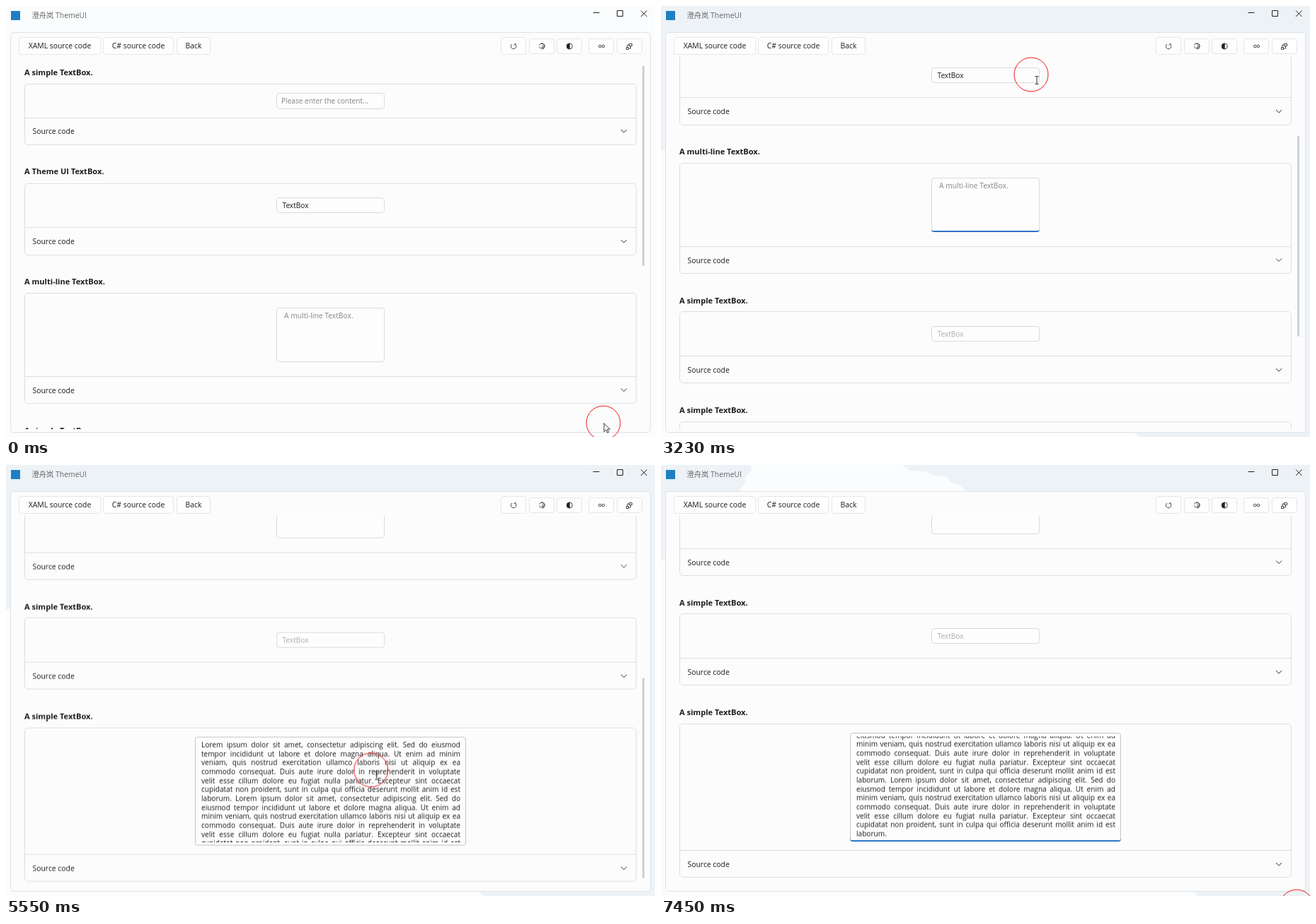
Recreate the animation shown at these times as an HTML page. Size 917x610 px, loop 7.5 s.

```html
<!DOCTYPE html>
<html lang="en">
<head>
<meta charset="utf-8">
<title>TextBox gallery</title>
<style>
  html, body { margin: 0; width: 917px; height: 610px; overflow: hidden; }
  body { position: relative; background: #fafcfd; color: #1c1c1c; font: 10.4px/16px "Open Sans", "Noto Sans", sans-serif; }
  div, svg, span { position: absolute; box-sizing: border-box; }
  span { white-space: nowrap; }
  svg { left: 0; top: 0; overflow: visible; fill: none; stroke: #333; }

  .panel { left: 6px; top: 37px; width: 905px; height: 567px; background: #fcfcfc; border: 1px solid #dfe2e4; border-radius: 5px; }
  .btn { top: 44px; height: 25px; line-height: 23px; text-align: center; background: #fefefe; border: 1px solid #e6e6e6; border-radius: 4px; }
  .icon { top: 46px; width: 36px; height: 22px; }
  .view { left: 0; top: 72px; width: 917px; height: 527px; overflow: hidden; }
  .page { left: 0; top: -72px; width: 917px; height: 1000px; }
  .head { left: 26px; font-weight: 700; font-size: 11.05px; }
  .card { left: 26px; width: 865px; border: 1px solid #dedede; border-radius: 5px; }
  .rule { left: 0; right: 0; height: 1px; background: #dedede; }
  .box { left: 382px; width: 153px; background: #fdfdfd; border: 1px solid #dadada; border-radius: 4px; font-size: 10.1px; }
  .box > span { left: 7.5px; top: 2px; }
  .hint { color: #868686; }
  .off { color: #adadad; }
  .focus { inset: -1px; border-bottom: 2px solid #2b74c9; border-radius: 4px; }
  .caret { left: 46px; top: 5px; width: 1px; height: 12px; background: #111; }
  .clip { left: 8px; right: 7px; top: 4px; bottom: 4px; overflow: hidden; }
  .lorem { left: 0; right: 0; top: 0; }
  .lorem p { margin: 0; height: 12.67px; line-height: 12.67px; white-space: nowrap; text-align: justify; text-align-last: justify; }
  .lorem p:last-child { text-align-last: left; }
  .thumb { left: 899px; top: 84px; width: 3px; height: 283.5px; border-radius: 2px; background: #d0d1d1; }

  .page, .thumb, .lorem, .pointer, .step { animation: 7.5s linear infinite; }
  .step { animation-timing-function: step-end; }
  .page { animation-name: scroll; }
  .thumb { animation-name: slide, fade; }
  .lorem { animation-name: inner; }
  .pointer { animation-name: move; animation-timing-function: ease-in-out; }
  .tint { animation-name: tint; }
  .blob { animation-name: blob; }
  .f1 { animation-name: f1; }
  .f2 { animation-name: f2; }
  .f3 { animation-name: f3; }
  .f5 { animation-name: f5; }
  .beam { animation-name: beam; }
  .arrow { animation-name: arrow; }

  @keyframes scroll {
    0%, 24% { transform: translateY(0); }
    33.3%, 58.5% { transform: translateY(-184px); }
    66.4%, 69.2% { transform: translateY(-368px); }
    74.7%, 82% { transform: translateY(-405px); }
    86%, 100% { transform: translateY(-406px); }
  }
  @keyframes slide {
    0%, 24% { transform: translateY(0); }
    33.3%, 58.5% { transform: translateY(99.8px); }
    66.4%, 69.2% { transform: translateY(199.2px); }
    74.7%, 82% { transform: translateY(219.5px); }
    86%, 100% { transform: translateY(220px); }
  }
  @keyframes fade {
    0%, .7% { opacity: 1; }
    5.3%, 24% { opacity: 0; }
    25%, 55.8% { opacity: 1; }
    55.86%, 58.5% { opacity: .6; }
    59.5%, 98% { opacity: 1; }
    99.3%, 100% { opacity: 0; }
  }
  @keyframes inner {
    0%, 77.87% { transform: translateY(0); }
    79.87% { transform: translateY(-66.5px); }
    85.3%, 100% { transform: translateY(-96.5px); }
  }
  @keyframes move {
    0%, .67% { transform: translate(844px, 590px); }
    10.4%, 14.4% { transform: translate(470px, 128px); }
    21.8%, 24% { transform: translate(467px, 280.5px); }
    33.47%, 35.6% { transform: translate(467px, 300px); }
    37.33% { transform: translate(470px, 349px); }
    43.05% { transform: translate(523px, 97px); }
    44.4%, 46.53% { transform: translate(531px, 88px); }
    51%, 58.53% { transform: translate(524px, 96.5px); }
    66.5%, 69.2% { transform: translate(472px, 432px); }
    75.6%, 81.3% { transform: translate(522px, 431.5px); }
    86.53%, 88% { transform: translate(480px, 462px); }
    90.67% { transform: translate(301px, 490px); }
    96.67%, 100% { transform: translate(898px, 625px); }
  }
  @keyframes tint { 0% { opacity: 0; } 10.4%, 100% { opacity: 1; } }
  @keyframes blob { 0% { opacity: 0; } 88%, 100% { opacity: 1; } }
  @keyframes f1 { 0% { opacity: 0; } 9.9% { opacity: 1; } 20%, 100% { opacity: 0; } }
  @keyframes f2 { 0% { opacity: 0; } 20% { opacity: 1; } 32% { opacity: 0; } 49.3% { opacity: 1; } 74.7%, 100% { opacity: 0; } }
  @keyframes f3 { 0% { opacity: 0; } 32% { opacity: 1; } 49.3%, 100% { opacity: 0; } }
  @keyframes f5 { 0% { opacity: 0; } 74.7%, 100% { opacity: 1; } }
  @keyframes beam {
    0%, 15%, 24.7%, 36%, 39.9%, 49.3%, 92%, 100% { opacity: 0; }
    9.6%, 21%, 30%, 38.1%, 42.8%, 65.3% { opacity: 1; }
  }
  @keyframes arrow {
    0%, 15%, 24.7%, 36%, 39.9%, 49.3%, 92%, 100% { opacity: 1; }
    9.6%, 21%, 30%, 38.1%, 42.8%, 65.3% { opacity: 0; }
  }
</style>
</head>
<body>
<svg width="917" height="610" style="stroke:none">
  <path class="step tint" fill="#edf2f7" d="M0 0H917V610H676L668 603 7 203 0 205Z"/>
  <path class="step blob" fill="#fafcfd" d="M126 0 128 8 118 18 120 24 109 38H433L420 27 408 24 405 17 385 14 372 9 352 8 340 0ZM0 135 7 133V206H0ZM660 603H754L757 610H660Z"/>
</svg>

<svg width="917" height="36">
  <rect x="7" y="7" width="13" height="13" fill="#1f7fc4" stroke="none"/>
  <path d="M829.5 9.5H838.5M863.5 6.5H871.5V14.5H863.5ZM897 6.5 905.5 15M905.5 6.5 897 15" stroke="#222"/>
</svg>
<span style="left:36.5px;top:5px;color:#666"><span style="position:static;font:10.3px 'Noto Sans CJK SC','Noto Sans CJK',sans-serif">澄舟岚</span> ThemeUI</span>

<div class="panel"></div>
<div class="btn" style="left:18px;width:116px">XAML source code</div>
<div class="btn" style="left:137px;width:100px">C# source code</div>
<div class="btn" style="left:241px;width:48px">Back</div>
<div class="btn icon" style="left:699px;top:44px;height:25px"></div>
<div class="btn icon" style="left:739px"></div>
<div class="btn icon" style="left:778px"></div>
<div class="btn icon" style="left:823px"></div>
<div class="btn icon" style="left:863px"></div>
<svg width="917" height="80" stroke-width=".9">
  <path d="M719.5 54.2A3.7 3.7 0 1 1 715 54M719.8 52.5V54.6H717.6"/>
  <path d="M753.5 55.5A4 4 0 1 1 757 61M753.5 57.5A2.4 2.4 0 1 0 757.5 55.5M756 53.5A3 3 0 1 1 758 59.5"/>
  <circle cx="796.3" cy="57" r="4"/><path d="M796.3 53A4 4 0 0 0 796.3 61Z" fill="#222"/>
  <circle cx="839.2" cy="57" r="1.8"/><circle cx="843.8" cy="57" r="1.8"/>
  <path d="M880.5 53.5H884.5V56.5H880.5ZM876.5 58.5H879.5V61.5H876.5ZM880.5 55H878V58.5M879.5 60H882.5V56.5"/>
</svg>

<div class="view">
  <div class="page" id="page">
    <div class="box" style="top:123px;height:23px"><span class="hint" style="left:6px">Please enter the content...</span><div class="step focus f1"></div></div>
    <div class="box" style="top:271px;height:22px"><span>TextBox</span>
      <div class="step focus f2"><div class="caret"></div><svg width="1" height="1"><path d="M137 8 143.5 14.5M143.5 8 137 14.5" stroke="#555"/></svg></div>
    </div>
    <div class="box" style="top:427px;height:77px"><span class="hint" style="left:10px;font-size:10.3px">A multi-line TextBox.</span><div class="step focus f3"></div></div>
    <div class="box" style="top:637px;height:22px"><span class="off">TextBox</span></div>
    <div class="box" style="left:267px;top:785px;width:383px;height:154px;border-color:#c4c4c4">
      <div class="clip"><div class="lorem" id="lorem"></div></div>
      <div class="step focus f5"></div>
    </div>
  </div>
</div>
<div class="thumb"></div>

<div class="pointer" style="left:0;top:0">
  <svg width="1" height="1">
    <circle r="24" stroke="#f01414"/>
    <path class="step arrow" d="M1 .5V12.5L3.8 9.8 5.8 14 7.6 13.2 5.7 9H9.4Z" fill="#fff" stroke="#222" stroke-width=".9"/>
    <path class="step beam" d="M5.5 2.5H7.5L8 3 8.5 2.5H10.5M8 3V13M5.5 13.5H7.5L8 13 8.5 13.5H10.5" stroke="#222"/>
  </svg>
</div>

<script>
  // Title, then the y of heading, card top, divider, card bottom and footer text.
  const cards = [
    ["A simple TextBox.", 94, 110, 158, 197, 177],
    ["A Theme UI TextBox.", 234, 251, 313, 353, 333],
    ["A multi-line TextBox.", 390, 406, 524, 563, 543.5],
    ["A simple TextBox.", 601, 616, 679, 718, 699],
    ["A simple TextBox.", 756, 772, 951, 990, 971]
  ];
  const cardHtml = ([title, head, top, rule, bottom, foot]) => `
    <span class="head" style="top:${head - 8}px">${title}</span>
    <div class="card" style="top:${top}px;height:${bottom - top}px">
      <div class="rule" style="top:${rule - top - 1}px"></div>
      <span style="left:10.5px;top:${foot - top - 9}px">Source code</span>
      <svg width="1" height="1"><path d="M842 ${foot - top - 3} l4 4 4 -4"/></svg>
    </div>`;
  document.getElementById("page").insertAdjacentHTML("afterbegin", cards.map(cardHtml).join(""));

  const first = [
    "Lorem ipsum dolor sit amet, consectetur adipiscing elit. Sed do eiusmod",
    "tempor incididunt ut labore et dolore magna aliqua. Ut enim ad minim",
    "veniam, quis nostrud exercitation ullamco laboris nisi ut aliquip ex ea"
  ];
  const tail = [
    "commodo consequat. Duis aute irure dolor in reprehenderit in voluptate",
    "velit esse cillum dolore eu fugiat nulla pariatur. Excepteur sint occaecat",
    "cupidatat non proident, sunt in culpa qui officia deserunt mollit anim id est"
  ];
  const again = [
    "laborum. Lorem ipsum dolor sit amet, consectetur adipiscing elit. Sed do",
    "eiusmod tempor incididunt ut labore et dolore magna aliqua. Ut enim ad",
    "minim veniam, quis nostrud exercitation ullamco laboris nisi ut aliquip ex ea",
    ...tail
  ];
  const lines = [...first, ...tail, ...again, ...again, "laborum."];
  document.getElementById("lorem").innerHTML = lines.map(line => `<p>${line}</p>`).join("");
</script>
</body>
</html>
```
